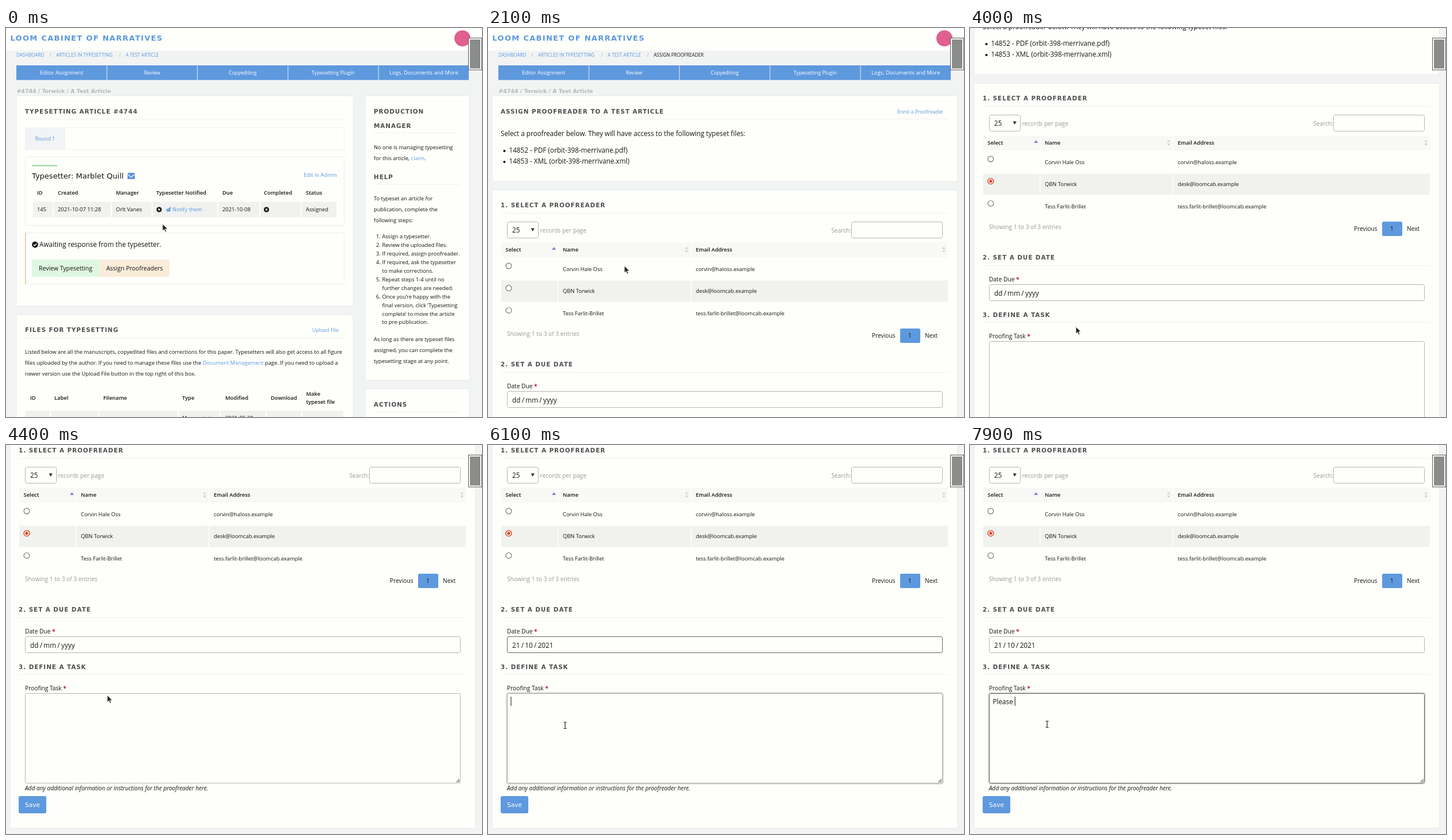
Animation of 827 by 677 pixels, one loop 8 s. Source, as an HTML page:

```html
<!DOCTYPE html>
<html lang="en">
<head>
<meta charset="utf-8">
<title>Assign a proofreader</title>
<style>
html, body { margin: 0; height: 100%; overflow: hidden; background: #f2f4f4; }
svg { display: block; width: 827px; height: 677px; font-family: "Open Sans", "Noto Sans", sans-serif; }
text { white-space: pre; }
.wide { font-family: "DejaVu Sans", sans-serif; }
</style>
</head>
<body>
<svg id="stage" viewBox="0 0 827 677"></svg>
<script>
const BLUE = '#5c98dd', INK = '#151515', PAPER = '#fefffb', GREY = '#f1f1ef', RULE = '#f0f1ee', EDGE = '#b4b6b3';

// y is the middle of the capitals; baselines sit on whole pixels
const text = (x, y, str, size = 9.35, fill = INK, extra = '') =>
  `<text x="${x}" y="${Math.round(y + size * .36)}" font-size="${size}" fill="${fill}" ${extra}>${str}</text>`;
const rect = (x, y, w, h, fill, extra = '') =>
  `<rect x="${x}" y="${y}" width="${w}" height="${h}" fill="${fill}" ${extra}/>`;
const path = (d, fill, extra = '') => `<path d="${d}" fill="${fill}" ${extra}/>`;
const circle = (x, y, r, fill, extra = '') => `<circle cx="${x}" cy="${y}" r="${r}" fill="${fill}" ${extra}/>`;
const group = (id, body, extra = '') => `<g id="${id}" ${extra}>${body}</g>`;
const link = str => `<tspan fill="${BLUE}">${str}</tspan>`;
const panel = (x, y, w, h) => rect(x, y, w, h, PAPER, 'stroke="#eaecec"');
const box = (x, y, w, h, stroke = EDGE, r = 3, extra = '') =>
  rect(x + .5, y + .5, w - 1, h - 1, PAPER, `stroke="${stroke}" rx="${r}" ${extra}`);
const rule = (x, y, w) => rect(x, y, w, 1, RULE);
const heading = (x, y, str) =>
  text(x, y, str, 10.4, '#4c4f50', 'class="wide" font-weight="700" letter-spacing=".95"');
const bold = (x, y, str) => text(x, y, str, 9.35, INK, 'font-weight="600"');
const lines = (x, rows) => rows.map(([y, str]) => text(x, y, str)).join('');
const cells = (edges, y, h) => edges.slice(1).map((end, i) => rect(edges[i], y, end - edges[i] - 2, h, GREY)).join('');
const cross = (x, y) => circle(x, y, 4.6, INK) +
  path(`M${x - 1.6} ${y - 1.6}l3.2 3.2m0-3.2l-3.2 3.2`, 'none', 'stroke="#fff" stroke-width="1.3"');
const middle = 'text-anchor="middle"';

function pageTop(crumbs) {
  const nav = ['Editor Assignment', 'Review', 'Copyediting', 'Typesetting Plugin', 'Logs, Documents and More'];
  return rect(0, 0, 827, 39, PAPER) +
    text(7.5, 17, 'LOOM CABINET OF NARRATIVES', 13, BLUE, 'class="wide" font-weight="700" letter-spacing="1.3"') +
    circle(793, 18, 14, '#e0608f') +
    crumbs.map(([x, str], i) => text(x, 47.5, str, 8.05, i == 3 ? INK : BLUE) +
      (i ? text(x - 11.5, 47.5, '/', 8.05, '#aaa') : '')).join('') +
    rect(18, 65, 786, 25.5, '#5e99de') +
    nav.map((str, i) => text(96.6 + 157.3 * i, 78, str, i == 4 ? 9.35 : 8.8, '#fff', middle) +
      (i ? rect(17.5 + 157.3 * i, 65, 1, 25.5, '#dfeafa') : '')).join('') +
    text(18.5, 110, '#4744 / Torwick / A Test Article', 9.4, '#b6b9b9', 'class="wide" font-weight="700"');
}

const crumbs = [[18, 'DASHBOARD'], [87, 'ARTICLES IN TYPESETTING'], [208, 'A TEST ARTICLE']];

function articlePage() {
  const columns = [54, 90, 191, 261, 376, 448, 521];
  const titles = ['ID', 'Created', 'Manager', 'Typesetter Notified', 'Due', 'Completed', 'Status'];
  const values = ['145', '2021-10-07 11:28', 'Orlt Vanes', '', '2021-10-08', '', 'Assigned'];
  const steps = [[363, 'Assign a typesetter.'], [378, 'Review the uploaded files.'],
    [393, 'If required, assign proofreader.'], [408, 'If required, ask the typesetter'], [422.5, 'to make corrections.'],
    [437.5, 'Repeat steps 1-4 until no'], [452.5, 'further changes are needed.'], [467.5, 'Once you’re happy with the'],
    [482.5, 'final version, click ‘Typesetting'], [497.5, 'complete’ to move the article'], [512, 'to pre-publication.']];
  return pageTop(crumbs) +
    panel(18, 118, 585, 366) + heading(33, 145, 'TYPESETTING ARTICLE #4744') + rule(33, 158, 555) +
    box(33, 173, 555, 39, RULE, 0) + rect(33, 173, 70, 39, '#f1f3f4') + text(68, 193, 'Round 1', 8.8, BLUE, middle) +
    box(33, 224, 555, 120, '#ecede9', 1) + rect(45, 238.5, 44, 2, '#93d594') +
    text(45, 257.5, 'Typesetter: Marblet Quill', 13, INK, 'class="wide"') +
    rect(211, 252, 13, 11, BLUE, 'rx="1.5"') + path('M211 254.5l6.5 5 6.5-5', 'none', 'stroke="#fff" stroke-width="1.2"') +
    text(517, 256, 'Edit in Admin', 9.35, BLUE) +
    cells([47, 83, 184, 255, 369, 442, 514, 576], 302.5, 27) +
    columns.map((x, i) => bold(x, 287, titles[i]) + text(x, 316, values[i])).join('') +
    cross(266, 316) + cross(452.5, 316) +
    path('M277 317l9.5-6-1.5 9-3-1.3-1.6 2-.4-2.7z', BLUE) + path('M280.4 318.2l5-5.6', 'none', 'stroke="#f1f1ef" stroke-width=".7"') +
    text(289, 316, 'Notify them', 9.35, BLUE) +
    box(33, 356, 555, 90, '#ecede9', 1) + rect(33, 356, 1.6, 90, '#e6c886') +
    circle(50.5, 377, 5.4, INK) + path('M47.8 377l2 2 3.6-3.8', 'none', 'stroke="#fff" stroke-width="1.5"') +
    text(58, 377, 'Awaiting response from the typesetter.', 11.7) +
    rect(45, 403, 117.5, 30, '#dff7e0') + text(103.5, 418.5, 'Review Typesetting', 10.5, INK, middle) +
    rect(162.5, 403, 121.5, 30, '#f9ecd9', 'id="assign"') + text(223.3, 418.5, 'Assign Proofreaders', 10.5, INK, middle) +
    panel(18, 499, 585, 190) + heading(33, 525, 'FILES FOR TYPESETTING') + text(532, 526, 'Upload File', 8.8, BLUE) + rule(33, 539, 555) +
    lines(33, [
      [564, 'Listed below are all the manuscripts, copyedited files and corrections for this paper. Typesetters will also get access to all figure'],
      [583, `files uploaded by the author. If you need to manage these files use the ${link('Document Management')} page. If you need to upload a`],
      [601.5, 'newer version use the Upload File button in the top right of this box.']]) +
    [[42, 'ID'], [84, 'Label'], [169, 'Filename'], [306, 'Type'], [381, 'Modified'], [460, 'Download']]
      .map(([x, str]) => bold(x, 643.5, str)).join('') + bold(521.5, 636.5, 'Make') + bold(521.5, 650.5, 'typeset file') +
    cells([34, 78, 162, 300, 373, 453, 515, 588], 666, 20) + text(306, 679, 'Manuscript') + text(381, 679, '2021-05-20') +
    panel(624, 118, 181, 495) + heading(639, 145, 'PRODUCTION') + heading(639, 170, 'MANAGER') + rule(639, 182, 150) +
    lines(639, [[208, 'No one is managing typesetting'], [227, `for this article, ${link('claim')}.`],
      [297, 'To typeset an article for'], [316, 'publication, complete the'], [335, 'following steps:'],
      [541.5, 'As long as there are typeset files'], [560.5, 'assigned, you can complete the'], [579.5, 'typesetting stage at any point.']]) +
    heading(639, 259, 'HELP') + rule(639, 272, 150) + lines(653.5, steps) +
    [0, 1, 2, 3, 5, 7].map((row, i) => text(643, steps[row][0], i + 1 + '.')).join('') +
    panel(624, 628, 181, 60) + heading(639, 655.5, 'ACTIONS') + rule(639, 668, 150);
}

const sorter = x => path(`M${x - 3} 384.5h6l-3-4z M${x - 3} 387h6l-3 4z`, '#d3d4d2');
const label = (y, str) => text(33, y, `${str} <tspan fill="#c0242c" font-weight="700">*</tspan>`, 10.2);
const field = (id, y, h) =>
  rect(32, y - 1, 759, h + 2, 'none', `id="${id}Glow" rx="4" stroke="#cacaca" stroke-opacity=".6" stroke-width="2"`) +
  box(33, y, 757, h) + box(33, y, 757, h, '#555', 3, `id="${id}Border"`);

function proofreaderPage() {
  const people = [['Corvin Hale Oss', 'corvin@haloss.example'], ['QBN Torwick', 'desk@loomcab.example'],
    ['Tess Farlit-Brillet', 'tess.farlit-brillet@loomcab.example']];
  return pageTop([...crumbs, [288, 'ASSIGN PROOFREADER']]) +
    panel(7.5, 118, 808, 149) + heading(22, 145, 'ASSIGN PROOFREADER TO A TEST ARTICLE') +
    text(711, 145.5, 'Enrol a Proofreader', 8.8, BLUE) + rule(22, 158, 777) +
    text(22, 183.5, 'Select a proofreader below. They will have access to the following typeset files:', 11.7) +
    ['14852 - PDF (orbit-398-merrivane.pdf)', '14853 - XML (orbit-398-merrivane.xml)'].map((str, i) =>
      circle(28.5, 214 + 19 * i, 2.1, INK) + text(36.5, 213 + 19 * i, str, 11.7)).join('') +
    panel(7.5, 282, 808, 684) + heading(22, 308.5, '1. SELECT A PROOFREADER') + rule(22, 322, 777) +
    box(33, 337, 55, 29) + text(42, 352, '25', 11.7) + path('M74.5 348.5h6.4l-3.2 5.4z', '#333') +
    text(90.5, 352.5, 'records per page', 10.2, '#999') + text(596.5, 352, 'Search:', 10.2, '#999') + box(631, 337, 159, 29) +
    rect(23, 373, 776, 26, '#f8f9f6') + rect(23, 439.5, 776, 37, GREY) +
    [121, 352].map(x => rect(x, 373, 1.5, 104, PAPER)).join('') +
    bold(30.5, 385.5, 'Select') + bold(130, 385.5, 'Name') + bold(361, 385.5, 'Email Address') +
    path('M111 386h7l-3.5-5z', '#7f83d0') + sorter(345) + sorter(792) +
    people.map(([name, mail], i) => text(130, 419.5 + 38.4 * i, name) + text(361, 419.5 + 38.4 * i, mail) +
      circle(36, 414 + 38.7 * i, 4.9, '#fff', 'stroke="#777" stroke-width="1.2"')).join('') +
    group('chosen', circle(36, 452.7, 4.9, '#fff', 'stroke="#dc4a24" stroke-width="1.3"') + circle(36, 452.7, 2.7, '#dc4a24')) +
    text(33, 532.5, 'Showing 1 to 3 of 3 entries', 10.2, '#999') + text(667, 535.5, 'Previous', 10.2) +
    rect(716, 523, 35, 25, '#5e99de', 'rx="2.5"') + text(733, 535.5, '1', 10.2, INK, middle) + text(759, 535.5, 'Next', 10.2) +
    heading(22, 585.5, '2. SET A DUE DATE') + rule(22, 599, 777) + label(623.5, 'Date Due') + field('date', 632, 29) +
    rect(40, 639, 18, 17, '#dc4a24', 'id="dayMark"') + text(42, 647.5, '', 11.7, INK, 'id="date" word-spacing="-.7"') +
    heading(22, 685, '3. DEFINE A TASK') + rule(22, 698, 777) + label(722.5, 'Proofing Task') + field('task', 731, 157) +
    path('M781 886l7-7v7z', '#aaa') +
    text(39.5, 745.5, '', 11.7, INK, 'id="typed"') + rect(39.5, 737, 1, 16, '#111', 'id="caret"') +
    text(33, 896, 'Add any additional information or instructions for the proofreader here.', 10.05, INK, 'font-style="italic"') +
    rect(22, 910, 48, 30, '#5e99de', 'rx="3"') + text(46, 925.5, 'Save', 10.6, '#fff', 'class="wide" ' + middle);
}

function calendar() {
  const x = i => 60.3 + 24.3 * i;
  const days = Array.from({ length: 42 }, (_, i) => {
    const day = new Date(2021, 8, 27 + i), outside = day.getMonth() != 9, weekend = i % 7 > 4;
    const today = !outside && day.getDate() == 7;
    const fill = weekend ? (outside ? '#803726' : '#d0452a') : outside ? '#8d8c89' : '#fff';
    const cx = x(i % 7), cy = 428.7 + 18.25 * Math.floor(i / 7);
    return (today ? rect(cx - 10.7, cy - 8.3, 21, 16.5, '#6d6d6a', 'rx="2"') : '') +
      text(cx, cy, day.getDate(), 8, fill, middle + (today ? ' font-weight="700"' : ''));
  });
  return rect(36, 365, 194, 176.5, '#33322f', 'rx="5"') +
    rect(88.5, 379, 88, 16, '#4c4c49', 'stroke="#a5a5a2" rx="1.5"') + text(98, 387.2, 'October 2021', 9.3, '#fff') +
    path('M61.5 383l-4 4 4 4M204 383l4 4-4 4M163 385.5l3.5 3.5 3.5-3.5', 'none', 'stroke="#c8c8c5"') +
    ['Mon', 'Tue', 'Wed', 'Thu', 'Fri', 'Sat', 'Sun'].map((name, i) =>
      text(x(i), 410.5, name, 7.7, i > 4 ? '#97402c' : '#a3a29f', middle)).join('') + days.join('');
}

const cursors = {
  arrow: path('M0 0v12l2.8-2.6 2 4.4 2-.9-2-4.1h3.8z', '#222', 'stroke="#fff" stroke-width=".7"'),
  hand: path('M-1.2 .8Q0-.7 1.2.8V4.6l4.6 1Q7 6 6.8 7.4L6 11.5H0L-3.3 7.2Q-3 5.6-1.2 6.8z', '#fff', 'stroke="#111"') +
    path('M2 6v2M4 6.4v2', 'none', 'stroke="#111" stroke-width=".7"'),
  beam: path('M-2.5-5.5H-.7L0-5 .7-5.5H2.5M0-5V5M-2.5 5.5H-.7L0 5 .7 5.5H2.5', 'none', 'stroke="#222" stroke-width="1.2"')
};

const stage = document.getElementById('stage');
stage.innerHTML = group('article', articlePage()) + group('form', proofreaderPage()) +
  group('calendar', calendar()) +
  group('tab', rect(803.5, 17.5, 23, 55.5, '#fff', 'stroke="#555"') + rect(806, 20, 18, 50.5, '#8b8d8a')) +
  path('M0 666.5H191Q194 666.5 194 669.5V677H0z', '#323234', 'id="status"') +
  group('pointer', Object.entries(cursors).map(([kind, shape]) => group(kind, shape)).join(''));
const ui = id => document.getElementById(id);
const show = (id, visible) => ui(id).setAttribute('opacity', +visible);

const ramp = (t, from, to) => from >= to ? +(t >= to) : Math.min(1, Math.max(0, (t - from) / (to - from)));
const ease = p => p * p * (3 - 2 * p);

// start, end, x, y, cursor kind from the start on
const moves = [
  [0, 0, 272, 341, 'arrow'], [100, 700, 239, 414.5, 'arrow'], [900, 900, 248, 418, 'hand'], [1100, 1100, 245, 417, 'hand'],
  [1700, 1700, 241, 414.5, 'arrow'], [2100, 2100, 237, 414, 'arrow'], [2500, 2500, 231, 413.5, 'arrow'],
  [2600, 3400, 36, 457, 'arrow'], [3600, 3600, 184, 520, 'arrow'], [4200, 4600, 168, 351, 'arrow'],
  [4750, 4900, 161, 385, 'arrow'], [4900, 5400, 131, 483, 'arrow'], [5700, 6100, 134, 488, 'beam'],
  [6100, 6300, 139, 508, 'beam'], [6800, 6800, 257, 528, 'beam'], [7200, 7700, 134, 486, 'beam']];

function pointerAt(t) {
  let x = 0, y = 0, kind;
  for (const [start, end, toX, toY, type] of moves) {
    if (t < start) break;
    const p = ease(ramp(t, start, end));
    x += (toX - x) * p;
    y += (toY - y) * p;
    kind = type;
  }
  if (t < 1700 && y > 403) kind = 'hand';
  return { x, y, kind };
}

function scrollAt(t) {
  const stops = [0, 75, 186, 265, 299];
  return stops[Math.min(4, Math.max(0, t / 100 - 38))];
}

function draw(now) {
  const t = Math.floor(now % 8000 / 100) * 100;
  const pointer = pointerAt(t), onForm = t >= 1700;
  ui('pointer').setAttribute('transform', `translate(${pointer.x} ${pointer.y})`);
  for (const kind in cursors) show(kind, kind == pointer.kind);

  show('article', !onForm);
  show('form', onForm);
  show('tab', t < 1700 || t >= 1900);
  show('status', t >= 700 && !onForm);
  ui('assign').setAttribute('fill', pointer.kind == 'hand' ? '#e9c985' : '#f9ecd9');

  ui('form').setAttribute('transform', `translate(0 ${-scrollAt(t)})`);
  show('chosen', t >= 3500);
  show('calendar', ramp(t, 4500, 4700) - ramp(t, 5500, 5800));
  show('dateGlow', t >= 4700 && t < 6100);
  show('dateBorder', ramp(t, 4600, 4900) - ramp(t, 6050, 6300));
  show('taskGlow', t >= 6100);
  show('taskBorder', ramp(t, 6050, 6300));

  const marked = t >= 4600 && t < 6000;
  const [day, rest] = t < 5600 ? ['dd', ' / mm / yyyy'] : ['21', ' / 10 / 2021'];
  show('dayMark', marked);
  ui('date').innerHTML = `<tspan fill="${marked ? '#fff' : INK}">${day}</tspan>${rest}`;

  const count = t >= 7900 ? 7 : Math.min(5, Math.max(0, (t - 7200) / 100));
  ui('typed').textContent = 'Please '.slice(0, count);
  ui('caret').setAttribute('x', 39.5 + (count && ui('typed').getComputedTextLength()));
  show('caret', t >= 6100);
}

const began = performance.now();
function tick() {
  draw(performance.now() - began);
  requestAnimationFrame(tick);
}
tick();
</script>
</body>
</html>
```
